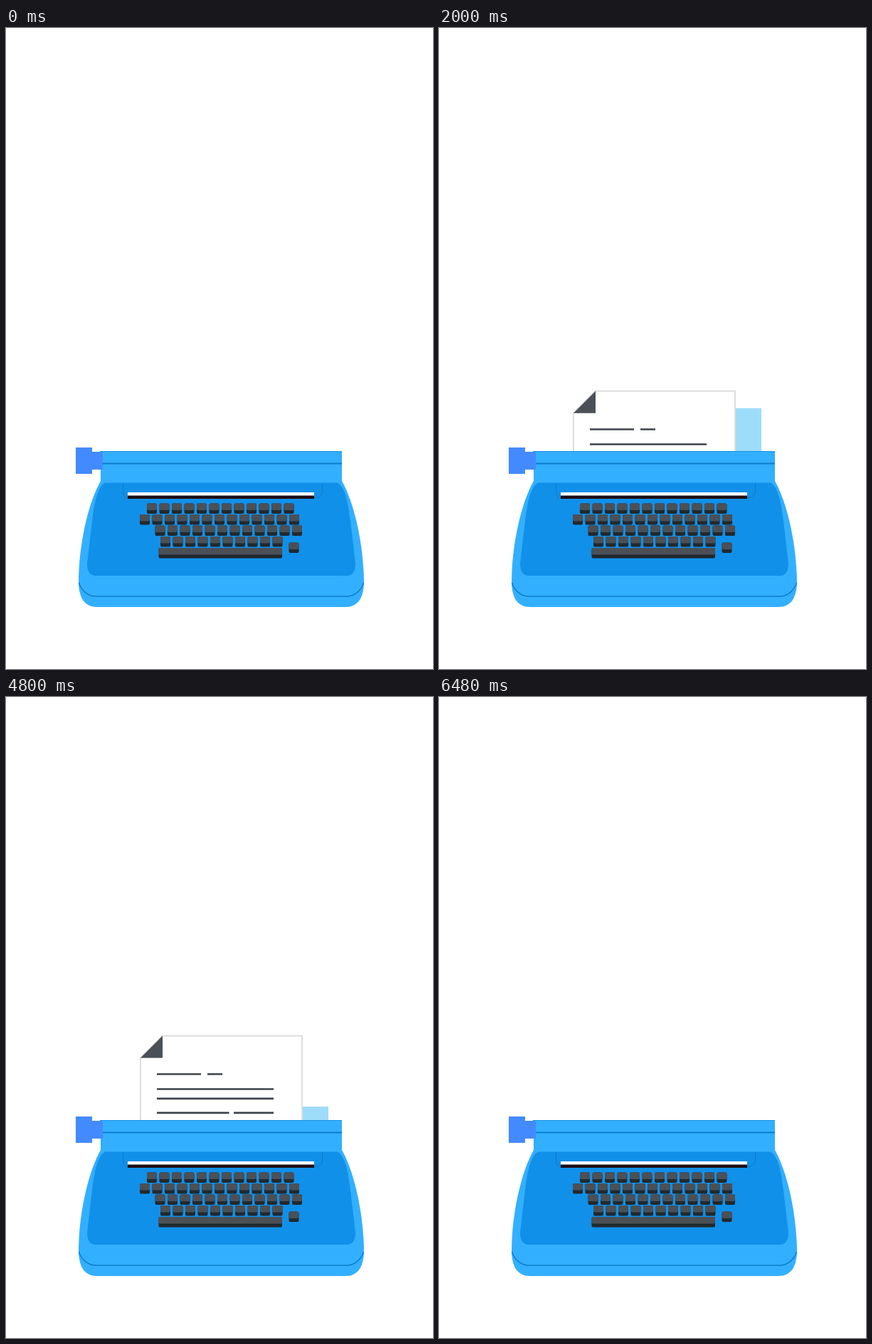
These frames come from a looping animation (600 by 900 pixels, 6.72 s). An HTML page:

```html
<!DOCTYPE html>
<html lang="en">
<head>
<meta charset="utf-8">
<title>Typewriter</title>
<style>
  html, body { margin: 0; width: 100%; height: 100%; overflow: hidden; background: #fff; }
  svg { display: block; width: 100%; height: 100%; }
</style>
</head>
<body>
<svg viewBox="0 0 600 900">
  <defs>
    <clipPath id="above"><rect width="600" height="594.5"/></clipPath>
  </defs>

  <g clip-path="url(#above)">
    <rect id="carbon" x="235" width="218" height="296" fill="#9eddfa"/>
    <g id="sheet">
      <path d="M220 0H416V296H189V31Z" fill="#fff" stroke="#dcdedf" stroke-width="2"/>
      <path d="M220 0V31H189Z" fill="#4b5057"/>
      <path d="M212 53.7H274M283 53.7H304M212 74.7H376M212 88H376M212 108H313.500M320 108H376M212 121.700H376"
            stroke="#3d434a" stroke-width="2.6"/>
    </g>
  </g>

  <path d="M133 594H472V636C491 670 503 730 503 780C502 801 494 813 477 813H128C111 813 103 801 102 780C102 730 114 670 133 636Z" fill="#33afff"/>
  <path d="M139 638.500H466C478 646 481 670 484 692L491 752Q491 769 479 769H126Q114 769 114 752L121 692C124 670 127 646 139 638.500Z" fill="#1190e9"/>
  <g fill="none" stroke="#0b7dcb">
    <path d="M132 594.500H472" stroke="#1b93e2"/>
    <path d="M133 611.500H472" stroke-width="2"/>
    <path d="M102.500 779C106 790 115 798 127 798H478C490 798 499 790 502.500 779" stroke-width="1.400"/>
    <path d="M164.500 639V651Q164.500 659 171 660M444.500 639V651Q444.500 659 433 660"/>
  </g>
  <path d="M98 589H121V595H136V620H121V626H98Z" fill="#448aff"/>
  <rect x="171" y="652" width="262" height="5" fill="#fff"/>
  <rect x="171" y="656.500" width="262" height="4.500" fill="#1d0d14"/>
  <g id="keys"></g>
</svg>
<script>
const LOOP = 6720, TICK = 80;
const $ = id => document.getElementById(id);
const carbon = $('carbon'), sheet = $('sheet'), keys = $('keys');

function addRect(x, y, width, height, fill) {
  const r = document.createElementNS('http://www.w3.org/2000/svg', 'rect');
  const attrs = { x, y, width, height, rx: 2, fill };
  for (const name in attrs) r.setAttribute(name, attrs[name]);
  keys.append(r);
}

function addKey(x, y, width = 14) {
  addRect(x, y, width, 14.5, '#22292d');
  addRect(x, y, width, 9.5, '#4b5056');
}

// first x, y, number of keys
for (const [x, y, count] of [[198, 667.5, 12], [188, 683, 13], [209.5, 698.5, 12], [217, 714, 10]]) {
  for (let i = 0; i < count; i++) addKey(x + i * 17.5, y);
}
addKey(214.5, 730, 173.5);
addKey(397.5, 722.5);

function easeOut(x) {
  return x <= 0 ? 0 : x >= 1 ? 1 : 1 - Math.pow(2, -10 * x);
}

// Each move is [start time, end position, duration].
function track(from, moves, t) {
  let y = from, prev = from;
  for (const [start, to, length = 1000] of moves) {
    y += (to - prev) * easeOut((t - start) / length);
    prev = to;
  }
  return y;
}

const ENTER = 308, ENTER_TIME = 640, EXIT = 5922;
const carbonMoves = [[ENTER, 466, ENTER_TIME], [1176, 534], [2556, 554], [3677, 575], [4799, 597]];
const sheetMoves = [[1176, 509], [2556, 498], [3677, 476], [4799, 454], [EXIT, 65]];

function draw(t) {
  carbon.setAttribute('y', track(193, carbonMoves, t));
  carbon.setAttribute('opacity', easeOut((t - ENTER) / ENTER_TIME));
  sheet.setAttribute('transform', `translate(0 ${track(759, sheetMoves, t)})`);
  sheet.setAttribute('opacity', Math.max(0, 1 - 1.03 * easeOut((t - EXIT) / 1000)));
}

const begin = performance.now();
function frame() {
  const t = (performance.now() - begin) % LOOP;
  draw(Math.floor(t / TICK) * TICK);
  requestAnimationFrame(frame);
}
frame();
</script>
</body>
</html>
```
